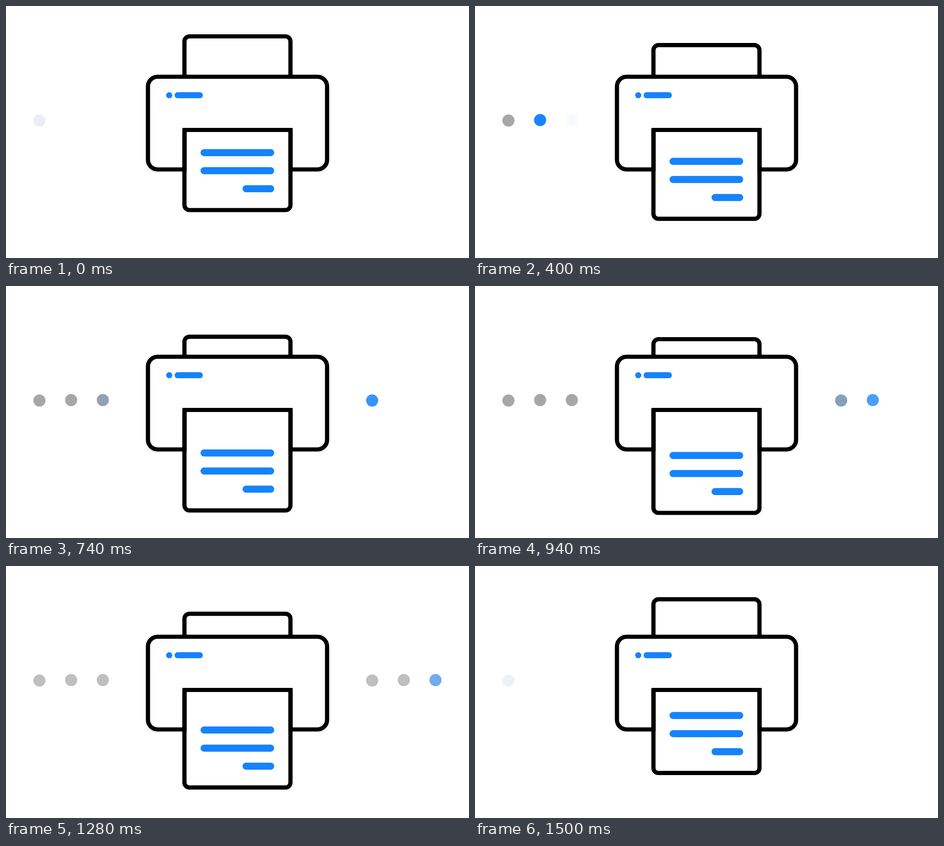
An HTML page for the animation above (1520 ms loop, 1014 px wide and 552 px high).

```html
<!DOCTYPE html>
<html lang="en">
<head>
<meta charset="utf-8">
<title>Printing</title>
<style>
  html, body { margin: 0; width: 100%; height: 100%; overflow: hidden; background: #fff; }
  svg { display: block; width: 100%; height: 100%; }
  .line { fill: #fff; stroke: #000; stroke-width: 9.2; }
  .ink { fill: #1583fc; }
</style>
</head>
<body>
<svg viewBox="0 0 1014 552">
  <defs>
    <clipPath id="below"><rect x="380" y="271" width="260" height="281"/></clipPath>
  </defs>
  <g id="dots"></g>
  <path class="line paper" d="M390.8 240V77.5a11 11 0 0 1 11 -11H612a11 11 0 0 1 11 11V240"/>
  <rect class="line" x="310.9" y="155" width="392.3" height="203" rx="21"/>
  <circle class="ink" cx="357.5" cy="195.4" r="6.7"/>
  <rect class="ink" x="369.3" y="188.7" width="61.8" height="13.4" rx="6.7"/>
  <g clip-path="url(#below)">
    <g class="paper">
      <path class="line" d="M390.8 200V436a11 11 0 0 0 11 11H612a11 11 0 0 0 11 -11V200"/>
      <rect class="ink" x="426" y="313.4" width="161.4" height="15.5" rx="7.75"/>
      <rect class="ink" x="426" y="353" width="161.4" height="15.5" rx="7.75"/>
      <rect class="ink" x="518" y="392.6" width="69.4" height="15.5" rx="7.75"/>
    </g>
  </g>
  <path class="line" fill-opacity="0" d="M391 362.6V271.5H623.2V362.6"/>
</svg>
<script>
const LOOP = 1520, STEP = 20, FADE = 170;
const BLUE = [21, 131, 255], GRAY = [167, 167, 167];
// Each dot starts to turn gray when the next one starts to appear.
const STARTS = [0, 180, 393, 595, 809, 1023, 1233];
const FADE_OUT = STARTS[6], GONE = FADE_OUT + FADE;
const X = [73.2, 142.6, 212.1, 801.9, 871.2, 940.6];

const papers = document.querySelectorAll('.paper');
const group = document.getElementById('dots');
const dots = X.map((x, i) => {
  const dot = document.createElementNS('http://www.w3.org/2000/svg', 'circle');
  dot.setAttribute('cx', x);
  dot.setAttribute('cy', i % 3 ? 249.8 : 250.8);
  dot.setAttribute('r', 13.3);
  return group.appendChild(dot);
});

const ramp = (t, start, span = FADE) => Math.min(1, Math.max(0, (t - start) / span));
const mix = (a, b, k) => a + (b - a) * k;

function paperShift(t) {
  if (t < 1040) return 25 * (1 - Math.cos(Math.PI * ramp(t, 0, 940)));
  return 50 - (0.01435 * (t - 1040)) ** 2;
}

function dotState(i, t) {
  let alpha = ramp(t, STARTS[i]) * (1 - ramp(t, FADE_OUT));
  let gray = ramp(t, STARTS[i + 1]);
  if (i === 0) {
    if (t < STARTS[1]) {
      const k = ramp(t, 0, 150);
      alpha = mix(0.177, 1, k);
      gray = mix(0.83, 0, k);
    } else if (t > GONE) {
      alpha = (t - GONE) * 0.00148;
      gray = 0.82;
    }
  }
  return { alpha, gray };
}

function draw(t) {
  const move = `translate(0 ${paperShift(t).toFixed(2)})`;
  papers.forEach(p => p.setAttribute('transform', move));
  dots.forEach((dot, i) => {
    const { alpha, gray } = dotState(i, t);
    const rgb = BLUE.map((c, n) => Math.round(mix(c, GRAY[n], gray)));
    dot.setAttribute('fill', `rgb(${rgb})`);
    dot.setAttribute('fill-opacity', alpha.toFixed(3));
  });
}

let begin;
function tick(now) {
  begin ??= now;
  const t = Math.max(0, now - begin) % LOOP;
  draw(Math.floor(t / STEP) * STEP);
  requestAnimationFrame(tick);
}
draw(0);
requestAnimationFrame(tick);
</script>
</body>
</html>
```
